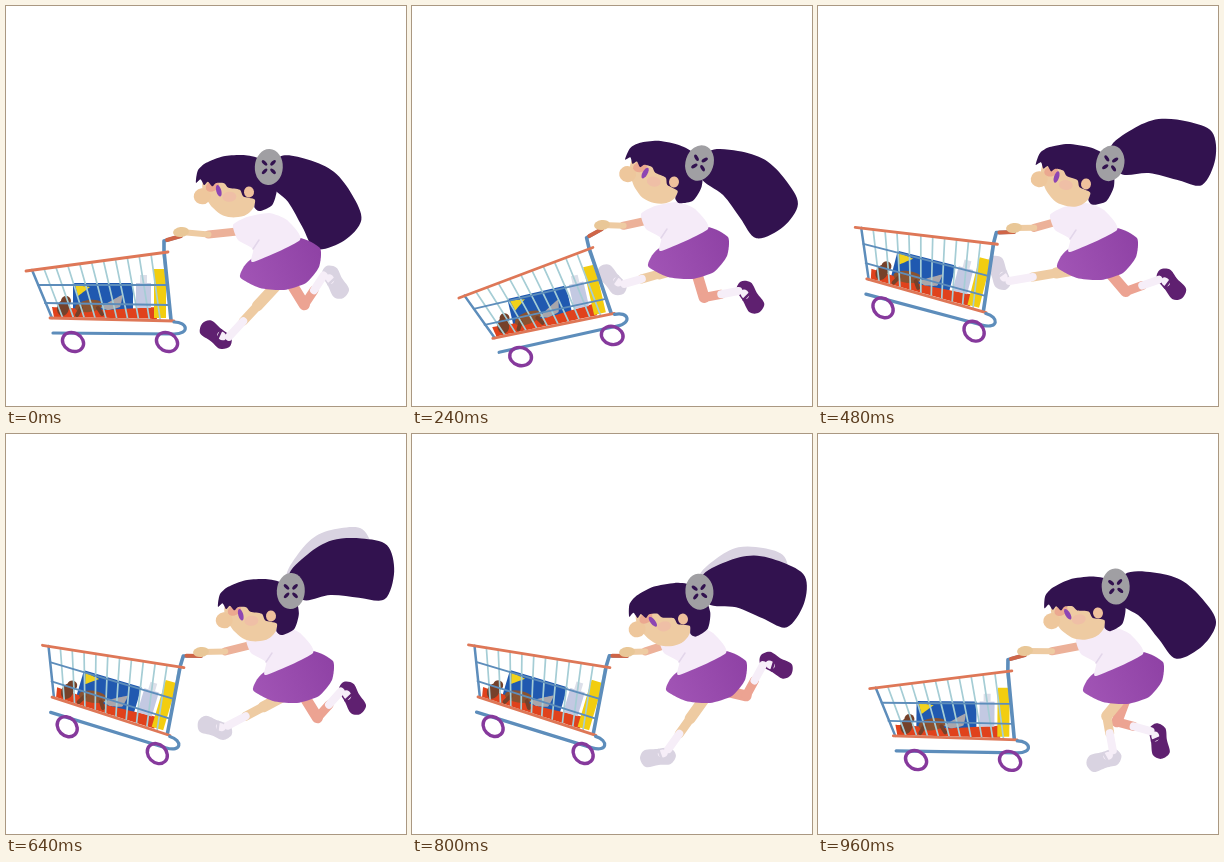
Animation, 400 px wide and 400 px high, one loop 1.04 s. Source, as an HTML page with a canvas:

```html
<!DOCTYPE html>
<html>
<head>
<meta charset="utf-8">
<title>Running with a cart</title>
<style>
html, body { margin: 0; height: 100%; overflow: hidden; background: #fff; }
canvas { display: block; width: 100vw; height: 100vh; }
</style>
</head>
<body>
<canvas id="stage" width="400" height="400"></canvas>
<script>
const g = document.getElementById('stage').getContext('2d');
const LOOP = 1040, STEP = 80;
const HAIR = '#32124f', SKIN = '#eecba2', ROSE = '#eca392', BLUE = '#5d8dbb',
  ORANGE = '#de7757', GREY = '#a09fa3', PLUM = '#5f2070', LILAC = '#d9d3e1',
  SOCK = '#f6eef8', HAND = '#e9c797', RED = '#e0421c', BROWN = '#75412a';

// time: handle x y tilt, ear x y, waist x y, plum shoe x y tilt, pale shoe x y tilt
const POSES = [
  [0, 175, 230, 0, 243, 186, 268, 243, 210, 329, 220, 329, 276, 62],
  [80, 183, 222, -5, 256, 173, 264, 228, 342, 330, 145, 226, 303, 160],
  [240, 190, 223, -13, 262, 176, 270, 232, 338, 291, 60, 200, 274, 230],
  [480, 196, 226, 14.4, 268, 178, 273, 233, 353, 278, 52, 181, 267, 250],
  [640, 195, 222, 16.6, 265, 182, 281, 228, 346, 264, 62, 209, 294, 202],
  [800, 215, 222, 16.7, 271, 185, 288, 228, 364, 231, 32, 246, 323, 175],
  [960, 207, 221, .5, 280, 179, 299, 229, 341, 307, 82, 286, 326, 165]];

const rad = d => d * Math.PI / 180;
const mix = (a, b, p) => a + (b - a) * p;
// cosine over one loop, highest at time peak
const wave = (t, peak) => Math.cos((t - peak) / LOOP * 2 * Math.PI);

function turn(x, y, tilt) {
  const c = Math.cos(rad(tilt)), s = Math.sin(rad(tilt));
  return [x * c - y * s, x * s + y * c];
}

function poseAt(t) {
  const i = POSES.findLastIndex(p => p[0] <= t);
  const a = POSES[i], b = POSES[i + 1] || a;
  const p = b === a ? 0 : (t - a[0]) / (b[0] - a[0]);
  return a.map((v, n) => mix(v, b[n], p)).slice(1);
}

// closed curve through flat x, y points; k is its roundness
function blob(pts, color, k = .16) {
  const n = pts.length / 2;
  const at = i => { const j = (i + n) % n * 2; return [pts[j], pts[j + 1]]; };
  g.beginPath();
  g.moveTo(pts[0], pts[1]);
  for (let i = 0; i < n; i++) {
    const [a, b, c, d] = [at(i - 1), at(i), at(i + 1), at(i + 2)];
    g.bezierCurveTo(b[0] + (c[0] - a[0]) * k, b[1] + (c[1] - a[1]) * k,
      c[0] - (d[0] - b[0]) * k, c[1] - (d[1] - b[1]) * k, c[0], c[1]);
  }
  g.fillStyle = color;
  g.fill();
}

function oval(x, y, rx, ry, tilt, color) {
  g.beginPath();
  g.ellipse(x, y, rx, ry, rad(tilt), 0, 7);
  g.fillStyle = color;
  g.fill();
}

function line(pts, color, width) {
  g.beginPath();
  for (let i = 0; i < pts.length; i += 2) g.lineTo(pts[i], pts[i + 1]);
  g.strokeStyle = color;
  g.lineWidth = width;
  g.stroke();
}

function box(x, y, w, h, color) {
  g.fillStyle = color;
  g.fillRect(x, y, w, h);
}

function within(x, y, tilt, paint) {
  g.save();
  g.translate(x, y);
  g.rotate(rad(tilt));
  paint();
  g.restore();
}

function goods() {
  box(67, 277, 60, 31, '#2059b0');
  blob([69, 279, 84, 281, 72, 290], '#f1d21c', 0);
  blob([46, 301, 100, 304, 150, 301, 151, 313, 48, 311], RED, 0);
  oval(60, 295, 5, 5, 0, BROWN);
  oval(57, 302, 6, 8, 10, BROWN);
  oval(83, 300, 14, 6, -8, '#8a5230');
  line([75, 302, 71, 309], BROWN, 4);
  line([92, 302, 96, 308], BROWN, 4);
  blob([95, 301, 116, 289, 114, 301, 102, 304], '#a9a6ab', .05);
  box(130, 277, 15, 25, '#c3c9e2');
  box(134, 269, 7, 8, '#dcdfe9');
  box(148, 263, 12, 49, '#f2cd10');
}

// turns about the end of its handle
function cart(x, y, tilt) {
  within(x, y, tilt, () => {
    g.translate(-175, -230);
    goods();
    for (let i = 0; i < 12; i++) {
      const p = i / 11;
      line([mix(26, 157, p), mix(264, 247, p), mix(46, 165, p), mix(312, 314, p)],
        i ? '#a5cdd5' : BLUE, i ? 1.7 : 2.5);
    }
    line([32, 279, 161, 279], BLUE, 1.8);
    line([39, 297, 163, 299], BLUE, 1.8);
    line([175, 230, 158, 235, 158, 245, 165, 314], BLUE, 3.6);
    line([20, 265, 162, 246], ORANGE, 2.8);
    line([44, 312, 168, 315], ORANGE, 2.8);
    line([161, 234, 175, 230], '#cf6547', 4);
    g.beginPath();
    g.moveTo(47, 327);
    g.lineTo(168, 328);
    g.bezierCurveTo(184, 328, 182, 316, 168, 316);
    g.strokeStyle = BLUE;
    g.lineWidth = 3.2;
    g.stroke();
    for (const wx of [67, 161]) {
      g.beginPath();
      g.ellipse(wx, 336, 11, 9, .5, 0, 7);
      g.strokeStyle = '#86399c';
      g.lineWidth = 3.4;
      g.stroke();
    }
  });
}

// two equal bones from hip to ankle, knee bent forwards
function leg(wx, wy, sx, sy, tilt, color) {
  const BONE = 35, hx = wx + 12, hy = wy + 26;
  const [ox, oy] = turn(-11, 7, tilt);
  const ax = sx + ox, ay = sy + oy;
  const dx = ax - hx, dy = ay - hy, d = Math.hypot(dx, dy);
  const bend = Math.sqrt(Math.max(0, BONE * BONE - d * d / 4)) / d;
  const kx = hx + dx / 2 - dy * bend, ky = hy + dy / 2 + dx * bend;
  const cx = mix(kx, ax, .5), cy = mix(ky, ay, .5);
  const skin = sx > kx ? ROSE : SKIN;
  line([hx, hy, kx, ky], skin, 11);
  line([kx, ky, cx, cy], skin, 9);
  within(sx, sy, tilt, () => {
    blob([-18, 0, -12, -8, 0, -8, 13, -9, 18, 0, 13, 8, 0, 8, -13, 8], color);
    oval(-5, 3, 5, 4, 0, SOCK);
  });
  line([cx, cy, ax, ay], SOCK, 8);
  within(sx, sy, tilt, () => line([-4, -4, -1, 7], color, 2.5));
}

function body(wx, wy, handX, handY) {
  within(wx, wy, 0, () => {
    const x = handX - wx, y = handY - wy - 4;
    const shade = g.createLinearGradient(-30, 35, 46, 0);
    shade.addColorStop(0, '#a154b5');
    shade.addColorStop(1, '#8f42a5');
    blob([23, -11, 46, -1, 45, 18, 32, 34, 10, 41, -14, 39, -34, 28, -24, 11], shade, .1);
    const ex = mix(-32, x, .55), ey = mix(-18, y, .55) + 3;
    line([-32, -18, ex, ey], '#ecb199', 8);
    line([ex, ey, x, y], SKIN, 6);
    oval(x, y, 8, 5, -8, HAND);
    blob([-41, -24, -27, -32, -5, -36, 13, -29, 26, -9, -21, 13, -21, 0, -36, -9], '#f5ebf8', .1);
    line([-21, 0, -15, -9], '#e3d6ea', 1.5);
  });
}

function tail(angle, color) {
  within(0, 0, angle, () =>
    blob([3, -15, 28, -29, 56, -34, 84, -26, 106, -11, 104, 16, 86, 39, 62, 29, 36, 17, 8, 12], color));
}

function head(tilt) {
  blob([-42, -18, -46, -6, -41, 7, -36, 14, -28, 21, -16, 24, -4, 22, 5, 12, 5, -10, -20, -22], SKIN);
  oval(-47, 0, 8.5, 8, 0, '#eec79c');
  oval(-36, -9, 7, 5, -20, '#eba890');
  oval(-20, 3, 7, 5, 0, '#efbfa6');
  oval(-30, -4, 2.5, 6, tilt * 2, '#8d45b3');
  blob([-52, -14, -49, -26, -40, -33, -22, -38, 0, -37, 16, -31, 26, -16, 28, 0, 22, 15, 9, 20,
    4, 16, 5, 8, -6, 4, -9, -3, -20, -6, -24, -11, -32, -12, -36, -9, -40, -14, -44, -11, -47, -17], HAIR, .12);
  oval(0, 0, 5, 5.5, 0, '#efc09c');
}

function bobble() {
  oval(0, 0, 14, 18, 8, GREY);
  for (let i = 0; i < 4; i++) {
    const [x, y] = turn(6, 0, 50 + i * 90);
    oval(x, y, 3.5, 1.7, 50 + i * 90, HAIR);
  }
}

function draw(t) {
  const [handX, handY, cartTilt, earX, earY, wx, wy, ...feet] = poseAt(t);
  const headTilt = 12 * wave(t, 320) - 1;
  const swing = 10 + 30 * wave(t, 90);
  const [kx, ky] = turn(22, -23, headTilt);
  const knotX = earX + kx, knotY = earY + ky;

  g.fillStyle = '#fff';
  g.fillRect(0, 0, 400, 400);
  g.lineCap = g.lineJoin = 'round';
  within(knotX, knotY, 0, () => {
    if (t >= 640 && t <= 800) {   // pale echo above the raised ponytail
      g.save();
      g.scale(.85, .95);
      tail(swing - 12, LILAC);
      g.restore();
    }
    tail(swing, HAIR);
  });
  leg(wx, wy, ...feet.slice(0, 3), PLUM);
  leg(wx, wy, ...feet.slice(3), LILAC);
  cart(handX, handY, cartTilt);
  body(wx, wy, handX, handY);
  within(earX, earY, headTilt, () => head(headTilt));
  within(knotX, knotY, headTilt, bobble);
}

function tick() {
  draw(Math.floor(performance.now() % LOOP / STEP) * STEP);
  requestAnimationFrame(tick);
}
tick();
</script>
</body>
</html>
```
